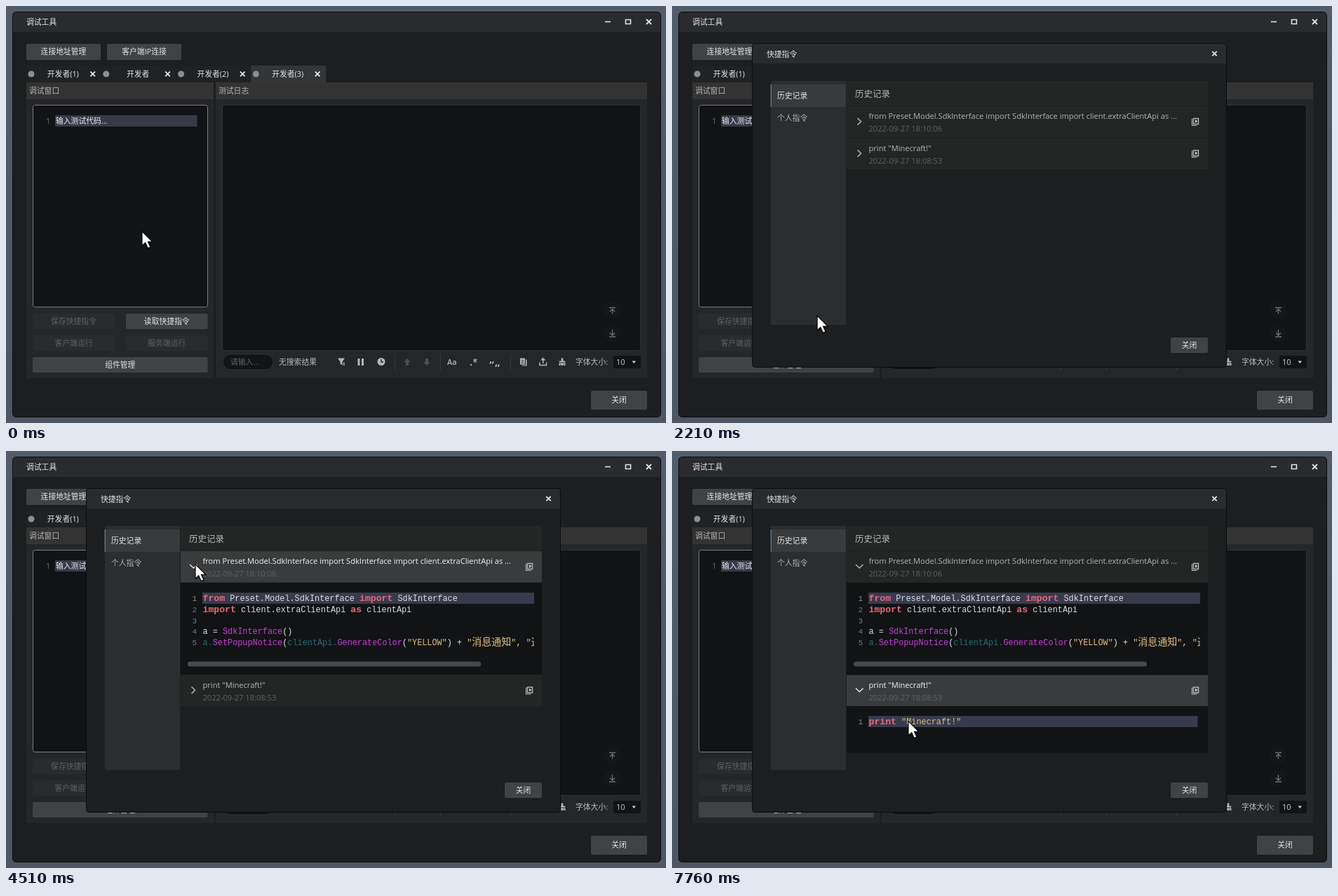
Animation, 941 px wide and 595 px high, one loop 8 s. Source, as an HTML page:

```html
<!DOCTYPE html>
<html lang="zh-CN">
<head>
<meta charset="utf-8">
<style>
html, body { margin: 0; width: 100%; height: 100%; overflow: hidden; background: #4f5a68; }
svg { display: block; width: 941px; height: 595px; }
text { font-family: "Open Sans", "Noto Sans CJK SC", "Noto Sans CJK", sans-serif; white-space: pre; }
.code text { font-family: "Liberation Mono", "Noto Sans CJK SC", "Noto Sans CJK", monospace; }
</style>
</head>
<body>
<svg id="stage" viewBox="0 0 941 595" xmlns="http://www.w3.org/2000/svg"></svg>
<script>
const LOOP = 8000;
const INK = '#121315', BODY = '#1d1e20', BAR = '#2a2b2d', PANEL = '#252628', BUTTON = '#414244';
const LIGHT = '#e4e4e4', GREY = '#b2b3b4', DIM = '#606163';

const rect = (x, y, w, h, fill, extra = '') =>
  `<rect x="${x}" y="${y}" width="${w}" height="${h}" fill="${fill}" ${extra}/>`;
// y is the optical middle of the line
const label = (x, y, s, fill = LIGHT, size = 10.8, extra = '') =>
  `<text x="${x}" y="${y + size * 0.37}" font-size="${size}" fill="${fill}" ${extra}>${s}</text>`;
const centered = (x, y, s, fill, size) => label(x, y, s, fill, size, 'text-anchor="middle"');
const line = (d, color, width = 1.5, extra = '') =>
  `<path d="${d}" fill="none" stroke="${color}" stroke-width="${width}" ${extra}/>`;
const shape = (d, fill) => `<path d="${d}" fill="${fill}" fill-rule="evenodd"/>`;
const cross = (x, y, r, width = 1.8) =>
  line(`M${x - r} ${y - r}l${2 * r} ${2 * r}m0 ${-2 * r}l${-2 * r} ${2 * r}`, LIGHT, width);
const button = (x, y, w, h, s, enabled = true) =>
  rect(x, y, w, h, enabled ? BUTTON : '#2a2b2d', 'rx="2"') +
  centered(x + w / 2, y + h / 2, s, enabled ? LIGHT : DIM);

function tabs() {
  return ['开发者(1)', '开发者', '开发者(2)', '开发者(3)'].map((name, i) => {
    const x = 29 + 106.8 * i;
    return rect(x, 85, 106.8, 24, i === 3 ? '#343536' : '#202123') +
      `<circle cx="${x + 7}" cy="97" r="4.5" fill="#8d8e8f"/>` +
      centered(x + 52.3, 97, name) + cross(x + 94.7, 97, 3.3, 1.9);
  }).join('');
}

function toolbar() {
  const c = '#b4b5b6', off = '#4d4e50';
  const arrow = (x, dir) =>
    shape(`M${x} ${508 - 5 * dir}l5 ${5 * dir}h-3v${5 * dir}h-4v${-5 * dir}h-3z`, off);
  return rect(309, 497, 72, 22, INK, 'rx="11" stroke="#303133"') + label(320, 508, '请输入...', DIM) +
    label(389, 508, '无搜索结果', '#b9babb') +
    shape('M473 502.500h10l-3.500 5v5l-3-2v-3z', c) + line('M480.500 509.500h2.500m-2.500 2.500h2.500', c, 1.3) +
    rect(501.5, 503, 3, 10, c) + rect(507, 503, 3, 10, c) +
    `<circle cx="535" cy="507.5" r="5.5" fill="${c}"/>` + line('M535 504v4h3', BODY, 1.3) +
    arrow(572, 1) + arrow(600, -1) +
    [554.5, 619.5, 719.5].map(x => line(`M${x} 496v24`, '#37383a', 1)).join('') +
    label(629, 508, 'Aa', c, 11, 'font-weight="600"') +
    rect(662, 511, 2, 2, c) + line('M669 503v6m-2.7-4.5l5.4 3m0-3l-5.4 3', c, 1.2) +
    label(689, 511, '“', c, 15, 'font-weight="700"') + label(697, 507, '„', c, 15, 'font-weight="700"') +
    shape('M733 502.500h7v9h-7zM741 504.500h1.500v9h-7v-1h5.500z', c) + line('M734.500 505.500h4m-4 2h4m-4 2h4', PANEL, .8) +
    line('M761 508.500v4h9.500v-4M765.700 510v-6', c) + shape('M765.700 501.500l3.500 4h-7z', c) +
    shape('M791.700 502.500h2.600v4h3v2h-8.600v-2h3zM788.500 509.500h9v3.500h-2v-2h-1v2h-3v-2h-1v2h-2z', c) +
    label(812, 508, '字体大小:', '#b9babb') +
    rect(866, 499, 39, 18, INK, 'rx="2"') + label(870, 508, '10', '#c8c9ca', 11.1) +
    shape('M892.500 506.500h5.500l-2.750 3.500z', '#d0d0d0');
}

function mainWindow() {
  const jump = (y, d) => `<circle cx="864.500" cy="${y}" r="12" fill="#151617"/>` + line(d, '#707173', 1.3);
  return rect(0, 0, 941, 595, 'url(#desk)') +
    rect(9.5, 8.5, 924, 578, BODY, 'rx="5" stroke="#0b0c0d"') +
    shape('M10 37V14q0-5 5-5H928q5 0 5 5V37z', BAR) +
    label(29, 23, '调试工具') +
    line('M854 22.500h8', LIGHT, 1.6) + line('M883.500 19.500h7v6h-7z', LIGHT, 1.6) + cross(916.5, 22.5, 3.5) +
    button(29, 54, 106, 23, '连接地址管理') + button(144, 54, 106, 23, '客户端IP连接') +
    tabs() +
    rect(29, 109, 885, 422, PANEL) + rect(29, 109, 885, 24, '#323332') + rect(296, 109, 3, 422, BODY) +
    label(33, 121, '调试窗口', GREY) + label(303, 121, '测试日志', GREY) +
    rect(38.5, 141.5, 249, 288, INK, 'rx="3" stroke="#7a7c7e" id="editor"') +
    rect(70, 156, 202.500, 16, '#383a4b') + label(57, 164, '1', '#6d6e70') + label(71, 164, '输入测试代码...', '#ececec') +
    button(38, 439, 117, 22, '保存快捷指令', false) + button(171, 439, 116.500, 22, '读取快捷指令') +
    button(38, 470, 117, 22, '客户端运行', false) + button(171, 470, 116.500, 22, '服务端运行', false) +
    button(38, 501, 249.500, 22, '组件管理') +
    rect(308.500, 141.500, 596, 350, INK, 'rx="3" stroke="#303133"') +
    jump(434, 'M860 430.500h9m-4.500 9v-7m-3.500 3.500l3.500-3.500l3.500 3.500') +
    jump(467, 'M860 472h9m-4.500-10v8m-3.500-3.500l3.500 3.500l3.500-3.500') +
    toolbar() + button(834, 549, 80, 27, '关闭');
}

const KINDS = {
  key: 'fill="#e8697a" font-weight="700" font-size="13.17"',
  fn: 'fill="#c53fd6"', obj: 'fill="#266b72"', str: 'fill="#e0bf78"',
  cjk: 'fill="#e0bf78" font-size="14"', txt: 'fill="#dcdcdc"'
};
function codeLine(y, number, ...tokens) {
  const spans = tokens.map(([kind, s]) => `<tspan ${KINDS[kind]}>${s}</tspan>`).join('');
  return label(265.5, y, number, number === 1 ? '#8a8b8c' : '#5d7f8c', 11.1) + label(280.5, y, spans, LIGHT, 11.85);
}

function commandRow(id, y, title, date) {
  return rect(249, y, 515, 44.5, '#242625', `id="${id}Bg"`) +
    line('', '#b8b9ba', 1.5, `id="${id}Arrow"`) +
    label(280.5, y + 14, title, GREY, 11.1, `id="${id}Title"`) +
    label(280.5, y + 32, date, DIM, 11.1) +
    line(`M741.500 ${y + 18}v9.500h7`, '#b0b1b2', 1.2) +
    line(`M743.500 ${y + 17.500}h7v8h-7z`, '#b0b1b2', 1.5) + shape(`M746 ${y + 19}l3.500 2.500l-3.500 2.500z`, '#c8c9ca');
}

function dialog() {
  return rect(114.5, 53.5, 676, 462, BODY, 'rx="4" stroke="#0a0b0c"') +
    shape('M115 82V58q0-4 4-4H786q4 0 4 4V82z', BAR) +
    label(135, 69, '快捷指令') + cross(773.5, 68, 3.2) +
    rect(141, 107, 107, 348, '#2c2d2f', 'rx="2"') + rect(141, 112, 107, 32, '#393a3b') + rect(140.5, 112, 1.5, 32, '#587388') +
    label(150, 128, '历史记录') + label(150, 160, '个人指令', GREY) +
    rect(249, 107, 515, 35, '#242625', 'rx="2"') + label(261, 125.5, '历史记录', '#b5b6b7', 12.5) +
    commandRow('first', 143, 'from Preset.Model.SdkInterface import SdkInterface import client.extraClientApi as ...', '2022-09-27 18:10:06') +
    '<g class="code" id="firstCode" clip-path="url(#codeClip)">' +
    rect(249, 188, 515, 131, INK) + rect(280, 202, 473, 16, '#383b4e') +
    codeLine(210, 1, ['key', 'from'], ['txt', ' Preset.Model.SdkInterface '], ['key', 'import'], ['txt', ' SdkInterface']) +
    codeLine(226, 2, ['key', 'import'], ['txt', ' client.extraClientApi '], ['key', 'as'], ['txt', ' clientApi']) +
    codeLine(242, 3) +
    codeLine(257, 4, ['txt', 'a = '], ['fn', 'SdkInterface'], ['txt', '()']) +
    codeLine(273, 5, ['obj', 'a.'], ['fn', 'SetPopupNotice'], ['txt', '('], ['obj', 'clientApi.'], ['fn', 'GenerateColor'],
      ['txt', '('], ['str', '"YELLOW"'], ['txt', ') + '], ['str', '"'], ['cjk', '消息通知'], ['str', '"'],
      ['txt', ', '], ['str', '"'], ['cjk', '这']) +
    rect(753, 189, 11, 129, INK) + rect(259, 300.5, 418, 7, '#47494b', 'rx="3"') + '</g>' +
    '<g id="second">' + commandRow('second', 188.500, 'print "Minecraft!"', '2022-09-27 18:08:53') +
    line('M249 188.500h515', '#1e1f20', 1) + '</g>' +
    '<g class="code" id="secondCode">' + rect(249, 364, 515, 67, INK) + rect(280, 378, 469.500, 16, '#383b4e') +
    codeLine(386, 1, ['key', 'print'], ['txt', ' '], ['str', '"Minecraft!"']) + '</g>' +
    button(711, 473, 53, 22, '关闭');
}

const stage = document.getElementById('stage');
stage.innerHTML = `<defs>
  <linearGradient id="desk" x2="0" y2="1"><stop stop-color="#525d6b"/><stop offset="1" stop-color="#4c5764"/></linearGradient>
  <clipPath id="codeClip"><rect x="249" y="188" width="515" height="131"/></clipPath></defs>` +
  mainWindow() + `<g id="dialog">${dialog()}</g>` +
  '<circle id="click" r="10.5" fill="#aaa01c" fill-opacity=".92"/>' +
  '<g id="cursor"><path d="M1 2v21l5-4.500l3.500 7l4.500-2l-3.500-7h6.500z" fill="#000" opacity=".3"/>' +
  '<path d="M0 0v20.500l4.700-4.300l3.500 7.800l3.700-1.600l-3.500-7.600h6.300z" fill="#fff" stroke="#000" stroke-width="1.1"/></g>';

const $ = id => document.getElementById(id);
const show = (id, on) => $(id).setAttribute('visibility', on ? 'inherit' : 'hidden');
const between = (t, a, b) => t >= a && t < b;

// Pointer moves: first step, last step, number of steps, end point, optional control points
const MOVES = [
  [860, 1350, 8, [206, 442]],
  [2210, 2980, 12, [268, 161]],
  [3050, 3050, 1, [270, 155]],
  [3380, 3520, 3, [270, 161]],
  [4110, 4110, 1, [269, 161]],
  [5100, 5860, 11, [265, 347], [278, 220], [237, 290]],
  [5930, 5930, 1, [266, 350]],
  [6130, 6410, 5, [267.5, 338.5]],
  [7270, 7760, 8, [336, 385]]
];

function pointerAt(t) {
  let from = [193, 321];
  for (const [start, end, steps, to, c1 = from, c2 = to] of MOVES) {
    if (t < start) break;
    if (t < end) {
      const step = Math.floor((t - start) / (end - start) * (steps - 1) + 0.05) + 1;
      const p = step / steps, u = p * p * (3 - 2 * p), v = 1 - u;
      return from.map((a, i) => v ** 3 * a + 3 * v * v * u * c1[i] + 3 * v * u * u * c2[i] + u ** 3 * to[i]);
    }
    from = to;
  }
  return from;
}

function setRow(id, y, active, open) {
  $(id + 'Bg').setAttribute('fill', active ? '#3a3b3c' : '#242625');
  $(id + 'Title').setAttribute('fill', active ? '#f2f2f2' : GREY);
  $(id + 'Arrow').setAttribute('stroke', active ? LIGHT : '#b0b1b2');
  $(id + 'Arrow').setAttribute('d', open ? `M262 ${y + 19}l5.300 5l5.300-5` : `M264.500 ${y + 17}l5 4.800l-5 4.800`);
}

function render(t) {
  const firstOpen = t >= 4510, secondOpen = t >= 6740;
  $('editor').setAttribute('stroke', between(t, 70, 270) ? '#55585a' : '#7a7c7e');
  show('dialog', t >= 1750);
  show('firstCode', t >= 1750 && firstOpen);
  show('secondCode', t >= 1750 && secondOpen);
  $('second').setAttribute('transform', `translate(0 ${firstOpen ? 131 : 0})`);
  setRow('first', 143, between(t, 4310, 6600), firstOpen);
  setRow('second', 188.5, t >= 6600, secondOpen);

  const [x, y] = pointerAt(t);
  $('cursor').setAttribute('transform', `translate(${x + 1} ${y + 0.5})`);
  $('click').setAttribute('cx', x - 0.5);
  $('click').setAttribute('cy', y - 1);
  show('click', between(t, 1550, 1680) || between(t, 4310, 4440) || between(t, 6600, 6670));
}

const began = performance.now();
function tick() {
  render((performance.now() - began) % LOOP);
  requestAnimationFrame(tick);
}
tick();
</script>
</body>
</html>
```
